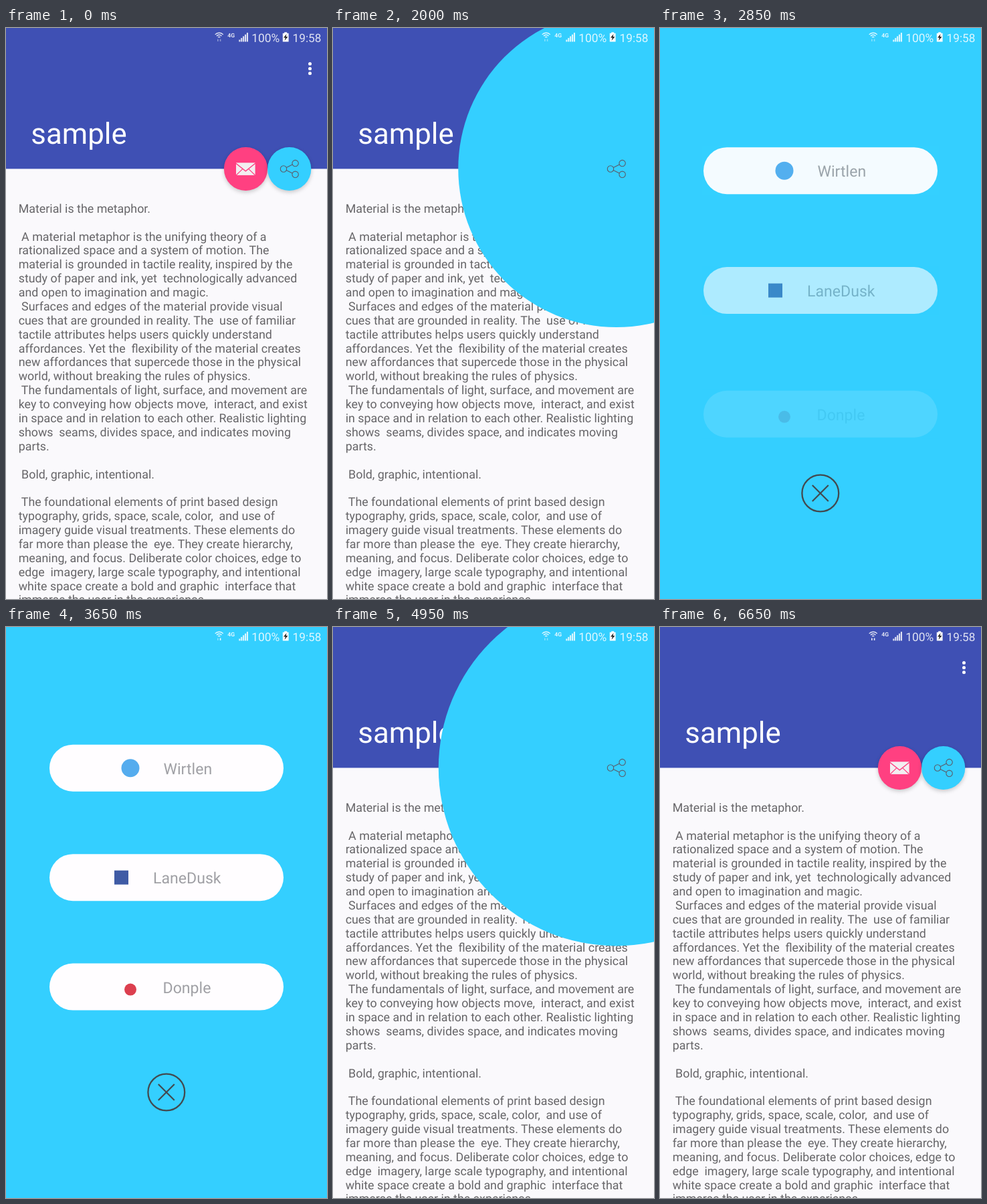
An HTML page with a canvas that plays this animation: 480 px wide and 853 px high, repeating every 6.7 s.

```html
<!DOCTYPE html>
<html lang="en">
<head>
<meta charset="utf-8">
<title>Share sheet</title>
<style>
  html, body { margin: 0; width: 100%; height: 100%; overflow: hidden; background: #faf9fc; }
  canvas { display: block; width: 480px; height: 853px; }
</style>
</head>
<body>
<canvas id="stage"></canvas>
<script>
const W = 480, H = 853, LOOP = 6700, STEP = 50;
const BLUE = '#34cfff', PINK = '#ff4081', FONT = 'Roboto, "Noto Sans", sans-serif';
const canvas = document.getElementById('stage');
const ctx = canvas.getContext('2d');
const dpr = window.devicePixelRatio || 1;
canvas.width = W * dpr;
canvas.height = H * dpr;

const LINES = [
  'Material is the metaphor.',
  '',
  ' A material metaphor is the unifying theory of a',
  'rationalized space and a system of motion. The',
  'material is grounded in tactile reality, inspired by the',
  'study of paper and ink, yet  technologically advanced',
  'and open to imagination and magic.',
  ' Surfaces and edges of the material provide visual',
  'cues that are grounded in reality. The  use of familiar',
  'tactile attributes helps users quickly understand',
  'affordances. Yet the  flexibility of the material creates',
  'new affordances that supercede those in the physical',
  'world, without breaking the rules of physics.',
  ' The fundamentals of light, surface, and movement are',
  'key to conveying how objects move,  interact, and exist',
  'in space and in relation to each other. Realistic lighting',
  'shows  seams, divides space, and indicates moving',
  'parts.',
  '',
  ' Bold, graphic, intentional.',
  '',
  ' The foundational elements of print based design',
  'typography, grids, space, scale, color,  and use of',
  'imagery guide visual treatments. These elements do',
  'far more than please the  eye. They create hierarchy,',
  'meaning, and focus. Deliberate color choices, edge to',
  'edge  imagery, large scale typography, and intentional',
  'white space create a bold and graphic  interface that',
  'immerse the user in the experience.'
];

const FAB = { x: 423.7, y: 210.5, r: 32.6 };
const REACH = Math.hypot(FAB.x, H - FAB.y);
const OPEN = 1813, CLOSE = 4650, REVEAL = 500;
const BUTTONS = [
  { label: 'Wirtlen', x: 235.5, y: 210.7, start: 2578, icon: () => disc(186, 0, 13.5, '#55acee') },
  { label: 'LaneDusk', x: 220, y: 374.2, start: 2669, icon: () => box(162, -10.5, 21, 21, '#3f5ba5') },
  { label: 'Donple', x: 234.5, y: 537.6, start: 2775, icon: () => disc(186, 4, 9, '#dc3f4f') }
];

const clamp = v => Math.min(1, Math.max(0, v));
const part = (t, start, length) => clamp((t - start) / length);
const ease = p => (1 - Math.cos(p * Math.PI)) / 2;

function box(x, y, w, h, color) {
  ctx.fillStyle = color;
  ctx.fillRect(x, y, w, h);
}

function disc(x, y, r, color) {
  ctx.fillStyle = color;
  ctx.beginPath();
  ctx.arc(x, y, r, 0, Math.PI * 2);
  ctx.fill();
}

function text(str, x, y, size, color, weight = 400) {
  ctx.font = `${weight} ${size}px ${FONT}`;
  ctx.textRendering = 'geometricPrecision';
  ctx.fillStyle = color;
  ctx.fillText(str, x, y);
}

function path(points, color, width) {
  ctx.strokeStyle = color;
  ctx.lineWidth = width;
  ctx.beginPath();
  points.forEach(([x, y], i) => i ? ctx.lineTo(x, y) : ctx.moveTo(x, y));
  ctx.stroke();
}

function ring(x, y, r, color, width, from = 0, to = Math.PI * 2) {
  ctx.strokeStyle = color;
  ctx.lineWidth = width;
  ctx.beginPath();
  ctx.arc(x, y, r, from, to);
  ctx.stroke();
}

function fab(x, y, color) {
  ctx.save();
  ctx.shadowColor = 'rgba(0,0,0,0.2)';
  ctx.shadowBlur = 6 * dpr;
  ctx.shadowOffsetY = 2.5 * dpr;
  disc(x, y, FAB.r, color);
  ctx.restore();
}

function envelope() {
  box(344, 201.3, 28.6, 18.6, '#f3eef1');
  path([[343.5, 202], [358.3, 213.8], [373, 202]], PINK, 1.5);
  path([[344, 220], [354, 210.4]], PINK, 1.2);
  path([[372.6, 220], [362.6, 210.4]], PINK, 1.2);
}

function shareIcon() {
  const ink = '#5a5c6a';
  path([[428.3, 204], [419.2, 208.5]], ink, 1.1);
  path([[428.3, 217], [419.2, 212.5]], ink, 1.1);
  ring(415, 210.5, 4.7, ink, 1.1);
  ring(432.6, 202.1, 4.7, ink, 1.1);
  ring(432.6, 218.8, 4.7, ink, 1.1);
}

function page() {
  box(0, 0, W, H, '#faf9fc');
  LINES.forEach((s, i) => text(s, 18.67, 275.8 + i * 20.88, 17.85, '#666568'));
  box(0, 0, W, 210.4, '#3f50b4');
  text('sample', 37.3, 173, 43.8, '#fff');
  for (let i = 0; i < 3; i++) disc(454.5, 53.6 + i * 7.1, 2.5, '#fff');
  fab(358.5, FAB.y, PINK);
  envelope();
  fab(FAB.x, FAB.y, BLUE);
}

function statusBar(t) {
  const ink = 'rgba(255,255,255,0.84)';
  [3, 6, 9].forEach(r => ring(318.7, 15.5, r - 0.8, ink, 1.4, -Math.PI * 0.76, -Math.PI * 0.24));
  const both = t >= 6650;
  const arrow = on => `rgba(255,255,255,${on ? 0.9 : 0.4})`;
  path([[316.8, 16.5], [316.8, 20]], arrow(both), 1.6);
  path([[320.6, 16.5], [320.6, 20]], arrow(both || t >= 3650 && t < 4350), 1.6);
  text('4G', 331.3, 13.8, 8.6, ink, 700);
  for (let i = 0; i < 5; i++) {
    const h = 3 + i * 2.6;
    box(348.3 + i * 2.9, 20.5 - h, 2.1, h, ink);
  }
  text('100%', 367.3, 20.7, 17.4, ink);
  box(416.2, 6.3, 4, 2, '#fff');
  box(413.8, 7.8, 8.8, 12.7, '#fff');
  ctx.fillStyle = '#222';
  ctx.beginPath();
  [[419.5, 9], [415, 14.6], [417.8, 14.6], [416.6, 19], [421.4, 13], [418.6, 13]]
    .forEach(([x, y]) => ctx.lineTo(x, y));
  ctx.fill();
  text('19:58', 428.6, 20.7, 17.2, ink);
}

function sheet(t) {
  const leave = 1 - part(t, 4450, 180);
  for (const b of BUTTONS) {
    const p = ease(part(t, b.start, 320));
    const alpha = p * leave;
    if (alpha <= 0) continue;
    ctx.save();
    ctx.translate(0, b.y + 45 * (1 - p));
    ctx.fillStyle = '#fffdff';
    ctx.beginPath();
    ctx.roundRect(65, -35, 350, 70, 35);
    ctx.fill();
    b.icon();
    text(b.label, b.x, 9, 23.1, '#a0a0a5');
    // A veil in the backdrop colour fades the button as one layer.
    ctx.globalAlpha = 1 - alpha;
    box(63, -37, 354, 74, BLUE);
    ctx.restore();
  }
  ctx.save();
  ctx.globalAlpha = part(t, 2320, 300) * leave;
  const ink = '#434a50';
  ring(239.8, 695, 27.4, ink, 2.3);
  path([[227.8, 683], [251.8, 707]], ink, 2.2);
  path([[251.8, 683], [227.8, 707]], ink, 2.2);
  ctx.restore();
}

function touch(t, start, x, y) {
  if (t >= start && t < start + 100) {
    disc(x, y, 12.4, 'rgba(215,240,250,0.75)');
    ring(x, y, 12, 'rgba(255,255,255,0.35)', 1);
  }
}

function draw(t) {
  ctx.setTransform(dpr, 0, 0, dpr, 0, 0);
  page();
  const grow = ease(part(t, OPEN, REVEAL)) - ease(part(t, CLOSE, REVEAL));
  if (grow > 0) disc(FAB.x, FAB.y, REACH * grow, BLUE);
  if (t < OPEN + REVEAL || t >= CLOSE - 50) shareIcon();
  if (t > OPEN + REVEAL && t < CLOSE) sheet(t);
  statusBar(t);
  touch(t, 1650, 436, 222.5);
  touch(t, 4350, 243, 697);
}

const born = performance.now();

function tick() {
  const t = (performance.now() - born) % LOOP;
  draw(Math.floor(t / STEP) * STEP);
  requestAnimationFrame(tick);
}

tick();
</script>
</body>
</html>
```
